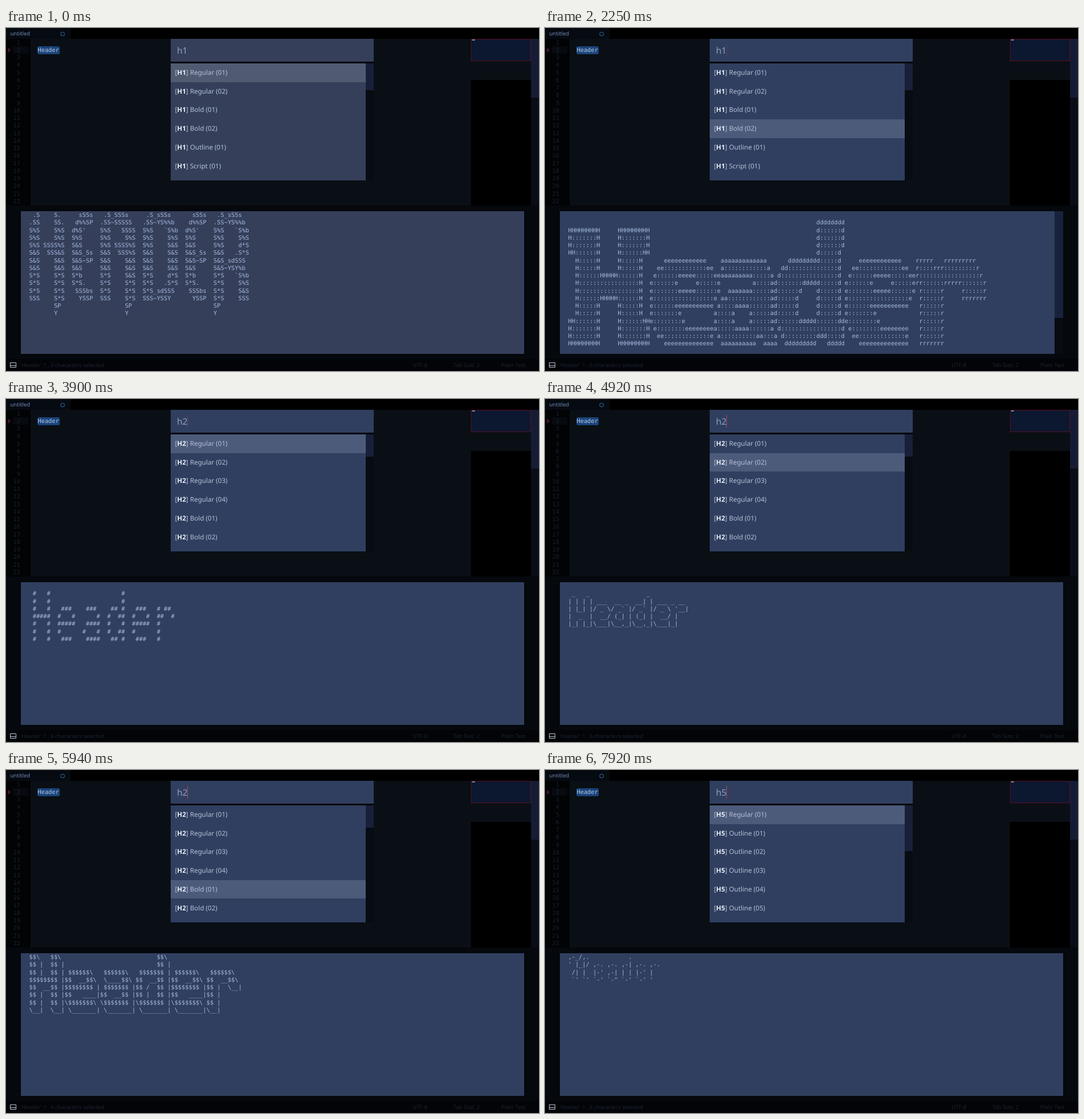
These frames come from a looping animation (932 by 601 pixels, 8 s). An HTML page:

```html
<!DOCTYPE html>
<html lang="en">
<head>
<meta charset="utf-8">
<title>Header picker</title>
<style>
  html, body { margin: 0; width: 100%; height: 100%; overflow: hidden; background: #000; }
  #stage {
    --panel: #303f5f; --pick: #4d5b7b;
    position: relative; width: 932px; height: 601px; overflow: hidden; background: #0a0f15;
    font: 9.5px "Noto Sans", sans-serif; text-rendering: geometricPrecision; white-space: pre;
  }
  #stage div, #stage pre, #stage svg { position: absolute; margin: 0; box-sizing: border-box; }
  pre { font: 10.3px/13.25px "DejaVu Sans Mono", monospace; }

  .tabs { left: 0; top: 0; width: 932px; height: 18.5px; background: #000; }
  .tab { left: 0; top: 0; width: 113px; height: 19px; background: #060a11; color: #7189b8; line-height: 20px; padding-left: 7.5px; }
  .gutter { left: 0; top: 18.5px; width: 43px; height: 293px; background: #010305; }
  .line { left: 12px; top: 32px; width: 27px; height: 13px; background: #070a10; }
  .nums { right: 907px; top: 19.6px; text-align: right; color: #1a212d; }
  .word { left: 54.5px; top: 32px; width: 39.5px; height: 14px; border-radius: 3px; background: #1a4379; }
  .text { left: 55.5px; top: 33px; color: #b3c7e6; }

  .map { left: 813px; top: 91px; width: 105px; height: 220px; background: #000; }
  .view { left: 813px; top: 18.5px; width: 105px; height: 39px; background: #0c1730; border: 1px solid #5a1023; }
  .mark { left: 815px; top: 20px; width: 5px; height: 1.5px; background: #74859c; }
  .bar { left: 918px; top: 18.5px; width: 14px; height: 293px; background: #0a0d16; }
  .bar div { left: 0; top: 0; width: 14px; height: 103px; background: #151c33; }

  .frame { left: 288px; top: 18px; width: 355px; height: 44px; background: #010306; }
  .query { left: 288px; top: 18.5px; width: 355px; height: 40px; background: var(--panel); }
  .query span { position: absolute; left: 11px; top: 0; font-size: 15.5px; line-height: 41px; color: #8f9fbd; }
  .query i { position: absolute; right: -1px; top: 9.5px; width: 1.5px; height: 22px; background: #b5485c; }
  .track { left: 628px; top: 62px; width: 15px; height: 205px; background: #070b12; }
  .thumb { left: 0; top: 0; width: 15px; background: #182039; }
  .list { left: 288px; top: 62px; width: 341px; height: 205px; background: var(--panel); }
  .list div { left: 0; width: 341px; height: 32.7px; padding-left: 7.5px; font-size: 11.6px; line-height: 33px; color: #b4c1da; }
  .list .on { background: var(--pick); }
  .list b { color: #eaf0fa; }

  .dock { left: 0; top: 311px; width: 932px; height: 269px; background: #05080c; }
  .out { left: 26px; top: 320.5px; width: 880px; height: 250px; background: var(--panel); }
  .scroll { left: 891px; top: 320.5px; width: 15px; height: 250px; background: #070b12; }
  .scroll div { left: 0; top: 0; width: 15px; height: 187px; background: #19223d; }
  .art { left: 40.5px; top: 322.2px; color: #a4b9df; }

  .status { left: 0; top: 580px; width: 932px; height: 21px; background: #020408; color: #1c2430; line-height: 21px; }
</style>
</head>
<body>
<div id="stage">
  <div class="tabs"><div class="tab">untitled</div></div>
  <div class="gutter"></div>
  <div class="line"></div>
  <pre class="nums"></pre>
  <div class="word"></div>
  <pre class="text">Header</pre>
  <div class="map"></div>
  <div class="view"></div>
  <div class="mark"></div>
  <div class="bar"><div></div></div>

  <div class="frame"></div>
  <div class="query"><span><em style="font-style:normal"></em><i></i></span></div>
  <div class="track"><div class="thumb"></div></div>
  <div class="list"></div>

  <div class="dock"></div>
  <div class="out"></div>
  <div class="scroll"><div></div></div>
  <pre class="art"></pre>

  <div class="status">
    <div style="left:25px;top:0">'Header' 1 , 6 characters selected</div>
    <div style="left:711px;top:0">UTF-8</div>
    <div style="left:782px;top:0">Tab Size: 2</div>
    <div style="left:866px;top:0">Plain Text</div>
  </div>
  <svg width="932" height="601" style="left:0;top:0" fill="none">
    <circle cx="99" cy="10.5" r="3.3" stroke="#2f6292" stroke-width="1.1"/>
    <path d="M3.5 34L8.5 38.8L3.5 43.5Z" fill="#47172b"/>
    <path d="M7.5 586.5H17.5V594.5H7.5ZM7.5 591.5H17.5" stroke="#b9c2d0"/>
  </svg>
</div>

<script type="text/plain" id="arts">
== serif
 .S    S.     sSSs   .S_SSSs     .S_sSSs      sSSs   .S_sSSs
.SS    SS.   d%%SP  .SS~SSSSS   .SS~YS%%b    d%%SP  .SS~YS%%b
S%S    S%S  d%S'    S%S   SSSS  S%S   `S%b  d%S'    S%S   `S%b
S%S    S%S  S%S     S%S    S%S  S%S    S%S  S%S     S%S    S%S
S%S SSSS%S  S&S     S%S SSSS%S  S%S    S&S  S&S     S%S    d*S
S&S  SSS&S  S&S_Ss  S&S  SSS%S  S&S    S&S  S&S_Ss  S&S   .S*S
S&S    S&S  S&S~SP  S&S    S&S  S&S    S&S  S&S~SP  S&S_sdSSS
S&S    S&S  S&S     S&S    S&S  S&S    S&S  S&S     S&S~YSY%b
S*S    S*S  S*b     S*S    S&S  S*S    d*S  S*b     S*S   `S%b
S*S    S*S  S*S.    S*S    S*S  S*S   .S*S  S*S.    S*S    S%S
S*S    S*S   SSSbs  S*S    S*S  S*S_sdSSS    SSSbs  S*S    S&S
SSS    S*S    YSSP  SSS    S*S  SSS~YSSY      YSSP  S*S    SSS
       SP                  SP                       SP
       Y                   Y                        Y
== press


____    ____                        ___
`MM'    `MM'                        `MM
 MM      MM                          MM
 MM      MM   ____      ___      ____MM   ____   ___  __
 MM      MM  6MMMMb   6MMMMb    6MMMMMM  6MMMMb  `MM 6MM
 MMMMMMMMMM 6M'  `Mb 8M'  `Mb  6M'  `MM 6M'  `Mb  MM69 "
 MM      MM MM    MM     ,oMM  MM    MM MM    MM  MM'
 MM      MM MMMMMMMM ,6MM9'MM  MM    MM MMMMMMMM  MM
 MM      MM MM       MM'   MM  MM    MM MM        MM
 MM      MM YM    d9 MM.  ,MM  YM.  ,MM YM    d9  MM
_MM_    _MM_ YMMMM9  `YMMM9'Yb. YMMMMMM_ YMMMM9  _MM_
== heavy

@@@  @@@  @@@@@@@@   @@@@@@   @@@@@@@   @@@@@@@@  @@@@@@@
@@@  @@@  @@@@@@@@  @@@@@@@@  @@@@@@@@  @@@@@@@@  @@@@@@@@
@@!  @@@  @@!       @@!  @@@  @@!  @@@  @@!       @@!  @@@
!@!  @!@  !@!       !@!  @!@  !@!  @!@  !@!       !@!  @!@
@!@!@!@!  @!!!:!    @!@!@!@!  @!@  !@!  @!!!:!    @!@!!@!
!!!@!!!!  !!!!!:    !!!@!!!!  !@!  !!!  !!!!!:    !!@!@!
!!:  !!!  !!:       !!:  !!!  !!:  !!!  !!:       !!: :!!
:!:  !:!  :!:       :!:  !:!  :!:  !:!  :!:       :!:  !:!
::   :::   :: ::::  ::   :::   :::: ::   :: ::::  ::   :::
 :   : :  : :: ::    :   : :  :: :  :   : :: ::    :   : :
== giant

                                                                      dddddddd
HHHHHHHHH     HHHHHHHHH                                               d::::::d
H:::::::H     H:::::::H                                               d::::::d
H:::::::H     H:::::::H                                               d::::::d
HH::::::H     H::::::HH                                               d:::::d
  H:::::H     H:::::H      eeeeeeeeeeee    aaaaaaaaaaaaa      ddddddddd:::::d     eeeeeeeeeeee    rrrrr   rrrrrrrrr
  H:::::H     H:::::H    ee::::::::::::ee  a::::::::::::a   dd::::::::::::::d   ee::::::::::::ee  r::::rrr:::::::::r
  H::::::HHHHH::::::H   e::::::eeeee:::::eeaaaaaaaaa:::::a d::::::::::::::::d  e::::::eeeee:::::eer:::::::::::::::::r
  H:::::::::::::::::H  e::::::e     e:::::e         a::::ad:::::::ddddd:::::d e::::::e     e:::::err::::::rrrrr::::::r
  H:::::::::::::::::H  e:::::::eeeee::::::e  aaaaaaa:::::ad::::::d    d:::::d e:::::::eeeee::::::e r:::::r     r:::::r
  H::::::HHHHH::::::H  e:::::::::::::::::e aa::::::::::::ad:::::d     d:::::d e:::::::::::::::::e  r:::::r     rrrrrrr
  H:::::H     H:::::H  e::::::eeeeeeeeeee a::::aaaa::::::ad:::::d     d:::::d e::::::eeeeeeeeeee   r:::::r
  H:::::H     H:::::H  e:::::::e         a::::a    a:::::ad:::::d     d:::::d e:::::::e            r:::::r
HH::::::H     H::::::HHe::::::::e        a::::a    a:::::ad::::::ddddd::::::dde::::::::e           r:::::r
H:::::::H     H:::::::H e::::::::eeeeeeeea:::::aaaa::::::a d:::::::::::::::::d e::::::::eeeeeeee   r:::::r
H:::::::H     H:::::::H  ee:::::::::::::e a::::::::::aa:::a d:::::::::ddd::::d  ee:::::::::::::e   r:::::r
HHHHHHHHH     HHHHHHHHH    eeeeeeeeeeeeee  aaaaaaaaaa  aaaa  ddddddddd   ddddd    eeeeeeeeeeeeee   rrrrrrr
== relief

 __  __                      __
/\ \/\ \                    /\ \
\ \ \_\ \     __     __     \_\ \     __   _ __
 \ \  _  \  /'__`\ /'__`\   /'_` \  /'__`\/\`'__\
  \ \ \ \ \/\  __//\ \L\.\_/\ \L\ \/\  __/\ \ \/
   \ \_\ \_\ \____\ \__/.\_\ \___,_\ \____\\ \_\
    \/_/\/_/\/____/\/__/\/_/\/__,_ /\/____/ \/_/
== hash

 #   #                    #
 #   #                    #
 #   #   ###    ###    ## #   ###   # ##
 #####  #   #      #  #  ##  #   #  ##  #
 #   #  #####   ####  #   #  #####  #
 #   #  #      #   #  #  ##  #      #
 #   #   ###    ####   ## #   ###   #
== thin

 _   _                _
| | | | ___  __ _  __| | ___ _ __
| |_| |/ _ \/ _` |/ _` |/ _ \ '__|
|  _  |  __/ (_| | (_| |  __/ |
|_| |_|\___|\__,_|\__,_|\___|_|
== wide
                                  #
 #     #                          #
 #     #                          #
 #     #   #####    ######   ######   #####    # ###
 #######  #     #  #     #  #     #  #     #   ##
 #     #  #######  #     #  #     #  #######   #
 #     #  #        #    ##  #     #  #         #
 #     #   #####    #### #   ######   #####    #
== round

ooooo   ooooo                           .o8
`888'   `888'                          "888
 888     888   .ooooo.   .oooo.    .oooo888   .ooooo.  oooo d8b
 888ooooo888  d88' `88b `P  )88b  d88' `888  d88' `88b `888""8P
 888     888  888ooo888  .oP"888  888   888  888ooo888  888
 888     888  888    .o d8(  888  888   888  888    .o  888
o888o   o888o `Y8bod8P' `Y888""8o `Y8bod88P" `Y8bod8P' d888b
== coin
$$\   $$\                           $$\
$$ |  $$ |                          $$ |
$$ |  $$ | $$$$$$\   $$$$$$\   $$$$$$$ | $$$$$$\   $$$$$$\
$$$$$$$$ |$$  __$$\  \____$$\ $$  __$$ |$$  __$$\ $$  __$$\
$$  __$$ |$$$$$$$$ | $$$$$$$ |$$ /  $$ |$$$$$$$$ |$$ |  \__|
$$ |  $$ |$$   ____|$$  __$$ |$$ |  $$ |$$   ____|$$ |
$$ |  $$ |\$$$$$$$\ \$$$$$$$ |\$$$$$$$ |\$$$$$$$\ $$ |
\__|  \__| \_______| \_______| \_______| \_______|\__|
== mini
,-_/,.           .
' |_|/ ,-. ,-. ,-| ,-. ,-.
 /| |  |-' ,-| | | |-' |
 `' `' `-' `-^ `-' `-' '
</script>

<script>
const LOOP = 8000;
const $ = sel => document.querySelector(sel);

const arts = {};
for (const block of $("#arts").textContent.split(/^== /m).slice(1)) {
  const cut = block.indexOf("\n");
  arts[block.slice(0, cut)] = block.slice(cut + 1);
}

const h1 = ["Regular (01)", "Regular (02)", "Bold (01)", "Bold (02)", "Outline (01)", "Script (01)"];
const h2 = ["Regular (01)", "Regular (02)", "Regular (03)", "Regular (04)", "Bold (01)", "Bold (02)"];
const h5 = ["Regular (01)", "Outline (01)", "Outline (02)", "Outline (03)", "Outline (04)", "Outline (05)"];
const menus = {
  h:  { level: 1, items: h1, thumb: 20 },
  h1: { level: 1, items: h1, thumb: 47 },
  h2: { level: 2, items: h2, thumb: 39 },
  h5: { level: 5, items: h5, thumb: 80 },
};

// start, query, selected row, preview
const steps = [
  [0, "h1", 0, "serif"], [1110, "h1", 1, "press"], [1380, "h1", 2, "heavy"],
  [2250, "h1", 3, "giant"], [2610, "h1", 4, "relief"], [2850, "h", 0, "relief"],
  [3900, "h2", 0, "hash"], [4920, "h2", 1, "thin"], [5490, "h2", 2, "wide"],
  [5670, "h2", 3, "round"], [5940, "h2", 4, "coin"], [6900, "h", 0, "coin"],
  [7560, "h5", 0, "mini"],
];

// start, caret opacity
const blinks = [
  [0, 0], [810, 1], [1110, 0], [1590, 1], [2250, .3], [2610, 0], [3120, 1], [3900, .45],
  [4380, 0], [4920, 1], [5160, 0], [5490, 1], [5700, 0], [5940, 1], [6270, 0],
  [6600, 1], [6900, 0], [7560, 0], [7920, 1],
];

const at = (table, t) => table.findLast(row => row[0] <= t);

function fillList(query, selected) {
  const { level, items } = menus[query];
  const tag = "H" + level, hit = tag.slice(0, query.length), rest = tag.slice(query.length);
  $(".list").replaceChildren(...items.map((name, i) => {
    const row = document.createElement("div");
    const bold = document.createElement("b");
    bold.textContent = hit;
    row.append("[", bold, `${rest}] ${name}`);
    row.style.top = i * 32.7 + "px";
    row.classList.toggle("on", i === selected);
    return row;
  }));
}

let shown;
function draw(t) {
  const step = at(steps, t);
  if (step !== shown) {
    const [, query, selected, art] = shown = step;
    $(".query em").textContent = query;
    $(".thumb").style.height = menus[query].thumb + "px";
    $(".art").textContent = arts[art];
    $(".scroll").style.display = art === "giant" ? "" : "none";
    fillList(query, selected);
  }
  $(".query i").style.opacity = at(blinks, t)[1];
  // the panels settle from a greyer tone at the start
  const k = Math.max(0, 1 - t / 480);
  const { style } = $("#stage");
  style.setProperty("--panel", `rgb(${48 + 5 * k}, 63, ${95 - 5 * k})`);
  style.setProperty("--pick", `rgb(${77 + 3 * k}, 91, ${123 - 10 * k})`);
}

$(".nums").textContent = Array.from({ length: 22 }, (_, i) => i + 1).join("\n");

const start = performance.now();
function tick() {
  draw((performance.now() - start) % LOOP);
  requestAnimationFrame(tick);
}
tick();
</script>
</body>
</html>
```
